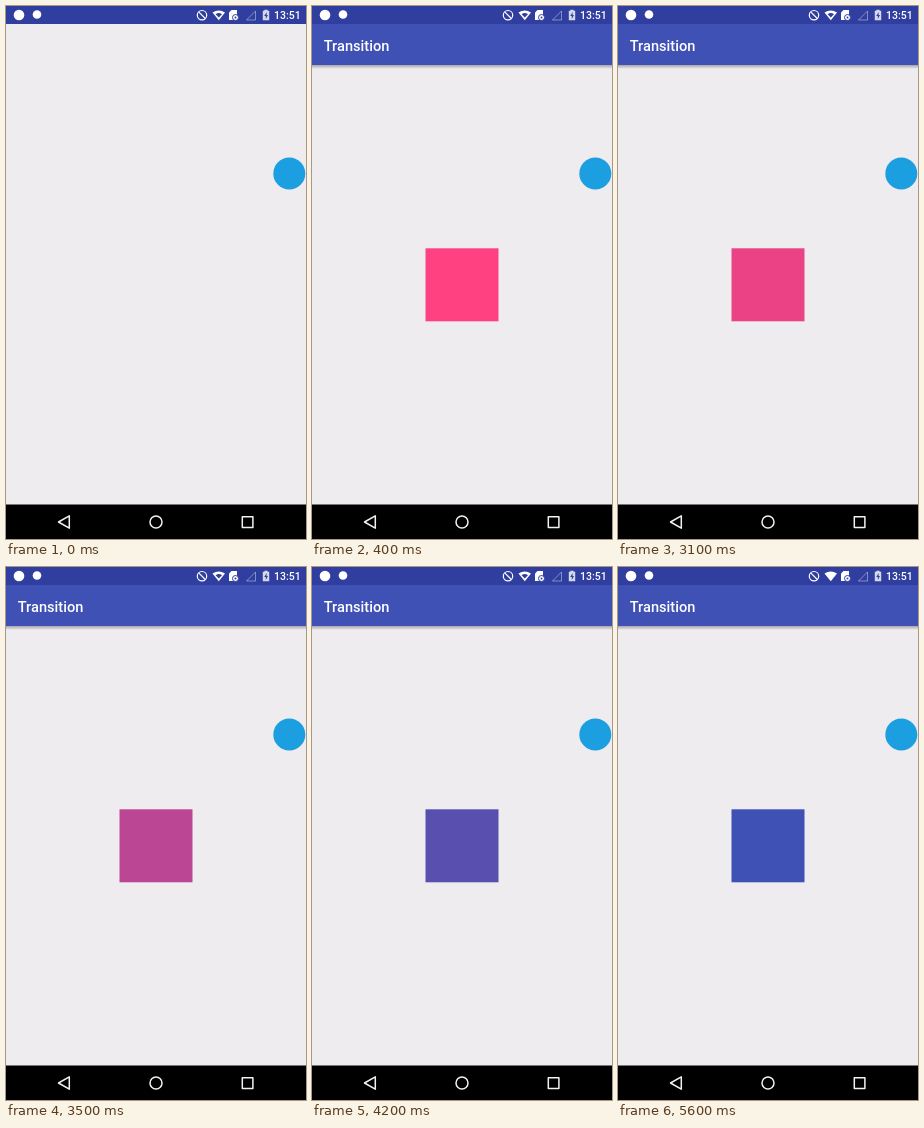
Recreate the animation shown at these times as an HTML page. Size 300 by 533 pixels, loop 6500 ms.

```html
<!DOCTYPE html>
<html lang="en">
<head>
<meta charset="utf-8">
<title>Transition</title>
<style>
  html, body { margin: 0; width: 100%; height: 100%; overflow: hidden; background: #eeecef; }
  svg { display: block; width: 100%; height: 100%; }
  text { font-family: Roboto, sans-serif; font-weight: 500; fill: #fff; }
</style>
</head>
<body>
<svg viewBox="0 0 300 533">
  <defs>
    <linearGradient id="shade" x2="0" y2="1">
      <stop offset="0" stop-opacity=".3"/>
      <stop offset="1" stop-opacity="0"/>
    </linearGradient>
  </defs>
  <rect width="300" height="533" fill="#eeecef"/>

  <g id="app">
    <rect y="59" width="300" height="4" fill="url(#shade)"/>
    <rect y="17" width="300" height="42" fill="#3f51b5"/>
    <text x="11.7" y="44.7" font-size="14.6">Transition</text>
    <rect id="box" x="113.5" y="242.3" width="73" height="73"/>
  </g>

  <!-- status bar -->
  <rect width="300" height="18" fill="#303f9f"/>
  <g fill="#fff">
    <circle cx="13" cy="9" r="5.3"/>
    <circle cx="31" cy="8.5" r="4.3"/>
    <path d="M206.5 6.5Q212.8 2.5 219 6.5L212.8 14.3Z"/>
    <path id="weak" d="M209.6 8.2Q212.8 6 216 8.2L212.8 11.4Z" fill="#303f9f"/>
    <path d="M225.5 4H231V14H223V6.5Z"/>
    <circle cx="229.5" cy="11.5" r="3" stroke="#303f9f"/>
    <circle cx="229.5" cy="11.5" r="1" fill="#303f9f"/>
    <path d="M258.4 4.8V3.8H261.6V4.8H263.2V14.3H256.8V4.8Z" fill="#d5d9ec"/>
    <path d="M260.7 6L258.2 10H259.8V13L262 9H260.5Z" fill="#303f9f"/>
  </g>
  <g fill="none" stroke="#fff" stroke-width="1.2">
    <circle cx="196" cy="9.2" r="4.7"/>
    <path d="M192.7 5.9L199.3 12.5"/>
    <path d="M249.5 5V14H240.5Z" stroke-width=".9" opacity=".45"/>
  </g>
  <text x="268" y="13" font-size="10.5">13:51</text>

  <circle cx="283.3" cy="167.5" r="16" fill="#1c9fe0"/>

  <!-- navigation bar -->
  <rect y="498.5" width="300" height="34.5"/>
  <g fill="none" stroke="#f2f2f2" stroke-width="1.5" stroke-linejoin="round">
    <path d="M52.5 516L63.3 509.8V522.2Z"/>
    <circle cx="150" cy="516" r="6"/>
    <rect x="236.3" y="510.8" width="10.6" height="10.6"/>
  </g>
</svg>
<script>
const LOOP = 6500, STEP = 100;
const PINK = [255, 64, 129], INDIGO = [63, 81, 181];
const byId = id => document.getElementById(id);
const app = byId('app'), box = byId('box'), weak = byId('weak');
const clamp = v => Math.min(1, Math.max(0, v));
const ease = p => (1 - Math.cos(Math.PI * clamp(p))) / 2;

function draw(now) {
  const t = Math.floor(now % LOOP / STEP) * STEP;
  const k = ease((t - 2680) / 2000);
  const rgb = PINK.map((c, i) => Math.round(c + (INDIGO[i] - c) * k));
  app.setAttribute('opacity', clamp(t / 150));
  box.setAttribute('fill', `rgb(${rgb})`);
  weak.setAttribute('opacity', t < 5600 ? 1 : 0);
}

let start;
function tick(now) {
  start ??= now;
  draw(now - start);
  requestAnimationFrame(tick);
}
draw(0);
requestAnimationFrame(tick);
</script>
</body>
</html>
```
